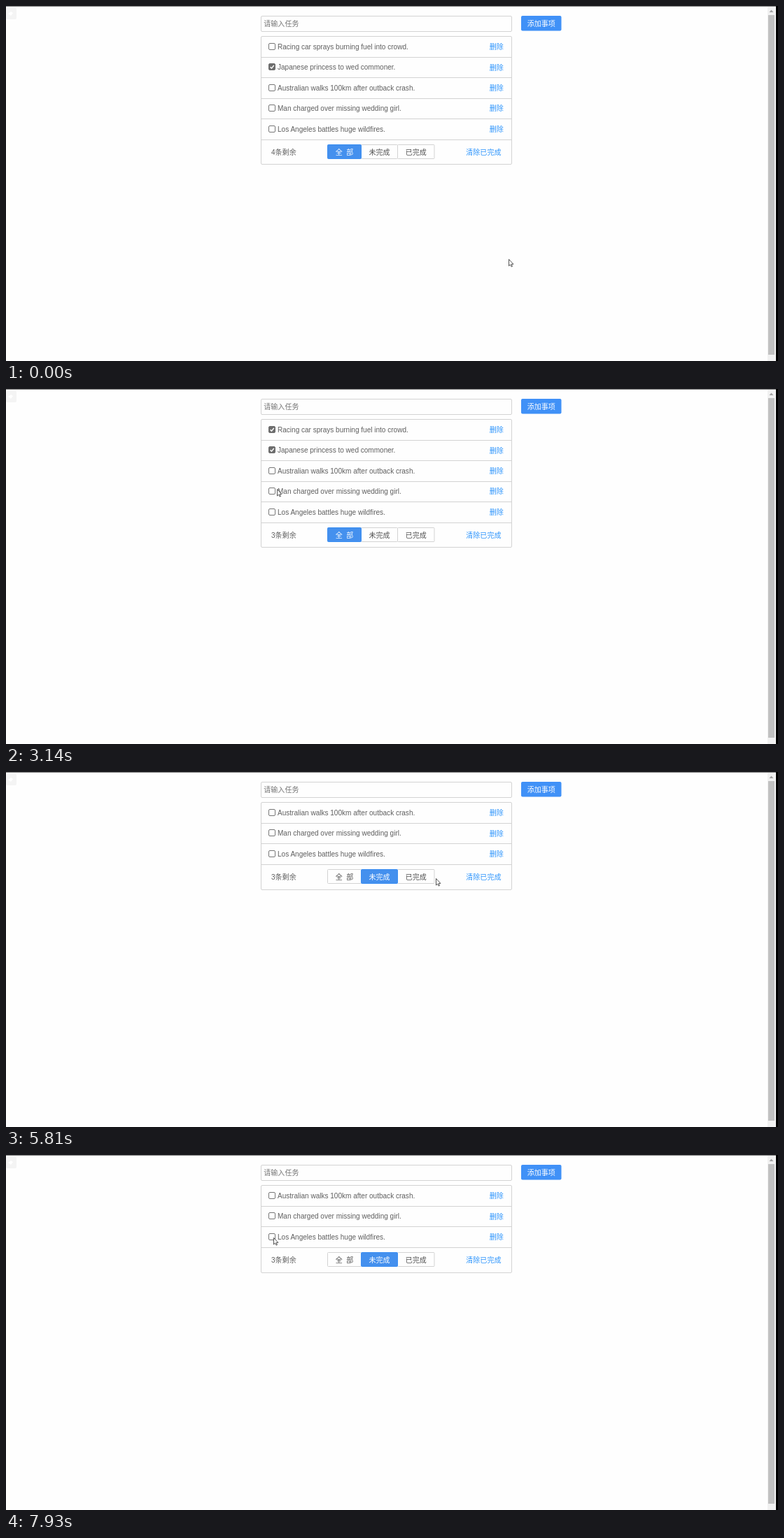
An HTML page for the animation above (8 s loop, 1103x508 px).

```html
<!DOCTYPE html>
<html lang="zh">
<head>
<meta charset="utf-8">
<title>Todo list</title>
<style>
html, body { margin: 0; width: 100%; height: 100%; overflow: hidden; background: #fefefe; }
svg { display: block; width: 1103px; height: 508px; }
text { font: 10.04px "Liberation Sans", "Noto Sans CJK SC", "Noto Sans CJK", sans-serif; fill: #5f5f5f; white-space: pre; }
.mid { text-anchor: middle; }
.line { fill: none; stroke: #d3d3d3; }
.link { fill: #2a93fc; }
.on { fill: #fff; }
.box { fill: #fff; stroke: #767676; }
.box.done { fill: #6d6d6d; stroke: #6d6d6d; }
.tick { fill: none; stroke: #fff; stroke-width: 1.4; }

.view, #hover { visibility: hidden; animation: 8s step-end infinite; }
#all4 { animation-name: all4; }
#all3 { animation-name: all3; }
#active { animation-name: active; }
#done { animation-name: done; }
#hover { animation-name: hover; }
@keyframes all4 { 0% { visibility: visible } 23.5%, 100% { visibility: hidden } }
@keyframes all3 { 0% { visibility: hidden } 23.5% { visibility: visible } 54%, 100% { visibility: hidden } }
@keyframes active {
  0% { visibility: hidden } 54% { visibility: visible }
  79.625% { visibility: hidden } 90.3%, 100% { visibility: visible }
}
@keyframes done { 0% { visibility: hidden } 79.625% { visibility: visible } 90.3%, 100% { visibility: hidden } }
@keyframes hover { 0% { visibility: hidden } 23.5% { visibility: visible } 27.25%, 100% { visibility: hidden } }

#pointer { animation: move 8s step-end infinite; }
@keyframes move {
  0% { transform: translate(718px, 362px) }
  .875% { transform: translate(718px, 362px); animation-timing-function: steps(3, start) }
  3.8% { transform: translate(830px, 389px); animation-timing-function: steps(2, start) }
  5.75% { transform: translate(867px, 370px); animation-timing-function: steps(6, start) }
  11.6% { transform: translate(450px, 287px); animation-timing-function: steps(5, start) }
  16.5% { transform: translate(385px, 80px); animation-timing-function: steps(6, start) }
  22.5% { transform: translate(372px, 46px) }
  23.5% { transform: translate(378px, 53px) }
  27.25% { transform: translate(378px, 53px); animation-timing-function: steps(4, start) }
  31.25% { transform: translate(513px, 205px); animation-timing-function: steps(3, start) }
  34.25% { transform: translate(371px, 215px); animation-timing-function: steps(4, start) }
  38.2% { transform: translate(397px, 180px) }
  39.2% { transform: translate(387px, 143px) }
  40.2% { transform: translate(364px, 120px) }
  42.1% { transform: translate(364px, 120px); animation-timing-function: steps(3, start) }
  45.1% { transform: translate(373px, 53px); animation-timing-function: steps(5, start) }
  50.1% { transform: translate(537px, 218px) }
  51% { transform: translate(537px, 209px) }
  55.8% { transform: translate(537px, 209px); animation-timing-function: steps(6, start) }
  61.6% { transform: translate(590px, 144px) }
  62.7% { transform: translate(588px, 151px) }
  63.7% { transform: translate(586px, 157px) }
  65.7% { transform: translate(585px, 157px) }
  67.6% { transform: translate(585px, 157px); animation-timing-function: steps(3, start) }
  70.6% { transform: translate(376px, 155px); animation-timing-function: steps(3, start) }
  73.6% { transform: translate(614px, 152px); animation-timing-function: steps(2, start) }
  75.6% { transform: translate(618px, 160px); animation-timing-function: steps(3, start) }
  78.6% { transform: translate(588px, 150px) }
  85.35% { transform: translate(588px, 150px); animation-timing-function: steps(4, start) }
  89.25% { transform: translate(536px, 117px) }
  91.2% { transform: translate(536px, 117px); animation-timing-function: steps(5, start) }
  96.1% { transform: translate(388px, 114px); animation-timing-function: steps(2, start) }
  98.1% { transform: translate(376px, 119px) }
  99.1%, 100% { transform: translate(382px, 118px) }
}
</style>
</head>
<body>
<svg viewBox="0 0 1103 508">
  <rect width="1100" height="1" fill="#7d7d7d"/>
  <rect y="3" width="15" height="16" rx="2" fill="#f4f4f4"/>
  <path d="M3 11l4 -3 3 2 -3 4z" fill="#fff"/>

  <rect x="1088" y="1" width="11" height="507" fill="#f1f1f1"/>
  <rect x="1089" y="13" width="9" height="486" fill="#c1c1c1"/>
  <path d="M1090.5 9l3 -3.5 3 3.5z" fill="#a3a3a3"/>
  <rect x="1100" width="3" height="508" fill="#000"/>

  <rect class="line" x="364.5" y="14.5" width="358" height="22" rx="1.5"/>
  <text x="368.3" y="29" style="fill:#757575">请输入任务</text>
  <rect x="736" y="14" width="57.5" height="21.5" rx="2" fill="#4091f7"/>
  <text class="on mid" x="764.7" y="28.8">添加事项</text>

  <g id="views"></g>
  <g id="hover">
    <rect class="box done" x="375.5" y="53.5" width="9" height="9" rx="1.5" style="fill:#505050;stroke:#505050"/>
    <path class="tick" d="M377.6 58.2l1.8 1.9 3.4 -4.1"/>
  </g>
  <path id="pointer" d="M.5 .5V10L2.6 8 4.1 11.1 5.5 10.5 4.1 7.4H6.9Z" fill="#fff" stroke="#2b2b2b" stroke-width=".8"/>
</svg>
<script>
const tasks = [
  'Racing car sprays burning fuel into crowd.',
  'Japanese princess to wed commoner.',
  'Australian walks 100km after outback crash.',
  'Man charged over missing wedding girl.',
  'Los Angeles battles huge wildfires.'
];
const tabs = [
  { label: '全\u00a0\u00a0部', x: 459.5, w: 48 },
  { label: '未完成', x: 507.5, w: 52 },
  { label: '已完成', x: 559.5, w: 52.5 }
];
const TOP = 43.3, ROW = 29.45;
const snap = y => Math.round(y) + .5;

function row(task, i, checked) {
  const y = TOP + ROW * i;
  const boxY = snap(y + 9.6);
  return `
    <rect class="box ${checked ? 'done' : ''}" x="375.5" y="${boxY}" width="9" height="9" rx="1.5"/>
    ${checked ? `<path class="tick" d="M377.6 ${boxY + 4.7}l1.8 1.9 3.4 -4.1"/>` : ''}
    <text x="388" y="${y + 18.6}">${tasks[task]}</text>
    <text class="link" x="690.8" y="${y + 18.8}">删除</text>
    <path class="line" d="M364 ${snap(y + ROW)}H723"/>`;
}

function tab({ label, x, w }, y, on) {
  const paint = on ? 'fill="#4490ee" stroke="#3c8ff2"' : 'class="line"';
  return `
    <rect x="${x}" y="${y}" width="${w}" height="20" rx="1" ${paint}/>
    <text class="mid ${on ? 'on' : ''}" x="${x + w / 2}" y="${y + 14.2}"
      ${on ? '' : 'style="fill:#505050"'}>${label}</text>`;
}

function view(id, shown, checked, left, picked) {
  const foot = TOP + ROW * shown.length;
  const bottom = snap(foot + 35.9);
  const order = [0, 1, 2].sort((a, b) => (a === picked) - (b === picked));
  return `<g class="view" id="${id}">
    <rect class="line" x="364.5" y="43.5" width="358" height="${bottom - 43.5}" rx="1.5"/>
    ${shown.map((task, i) => row(task, i, checked.includes(task))).join('')}
    <text x="379" y="${foot + 22}">${left}条剩余</text>
    ${order.map(i => tab(tabs[i], snap(foot + 7.5), i === picked)).join('')}
    <text class="link" x="657.3" y="${foot + 22}">清除已完成</text>
  </g>`;
}

const every = [0, 1, 2, 3, 4];
document.getElementById('views').innerHTML =
  view('all4', every, [1], 4, 0) +
  view('all3', every, [0, 1], 3, 0) +
  view('active', [2, 3, 4], [], 3, 1) +
  view('done', [0, 1], [0, 1], 3, 2);
</script>
</body>
</html>
```
